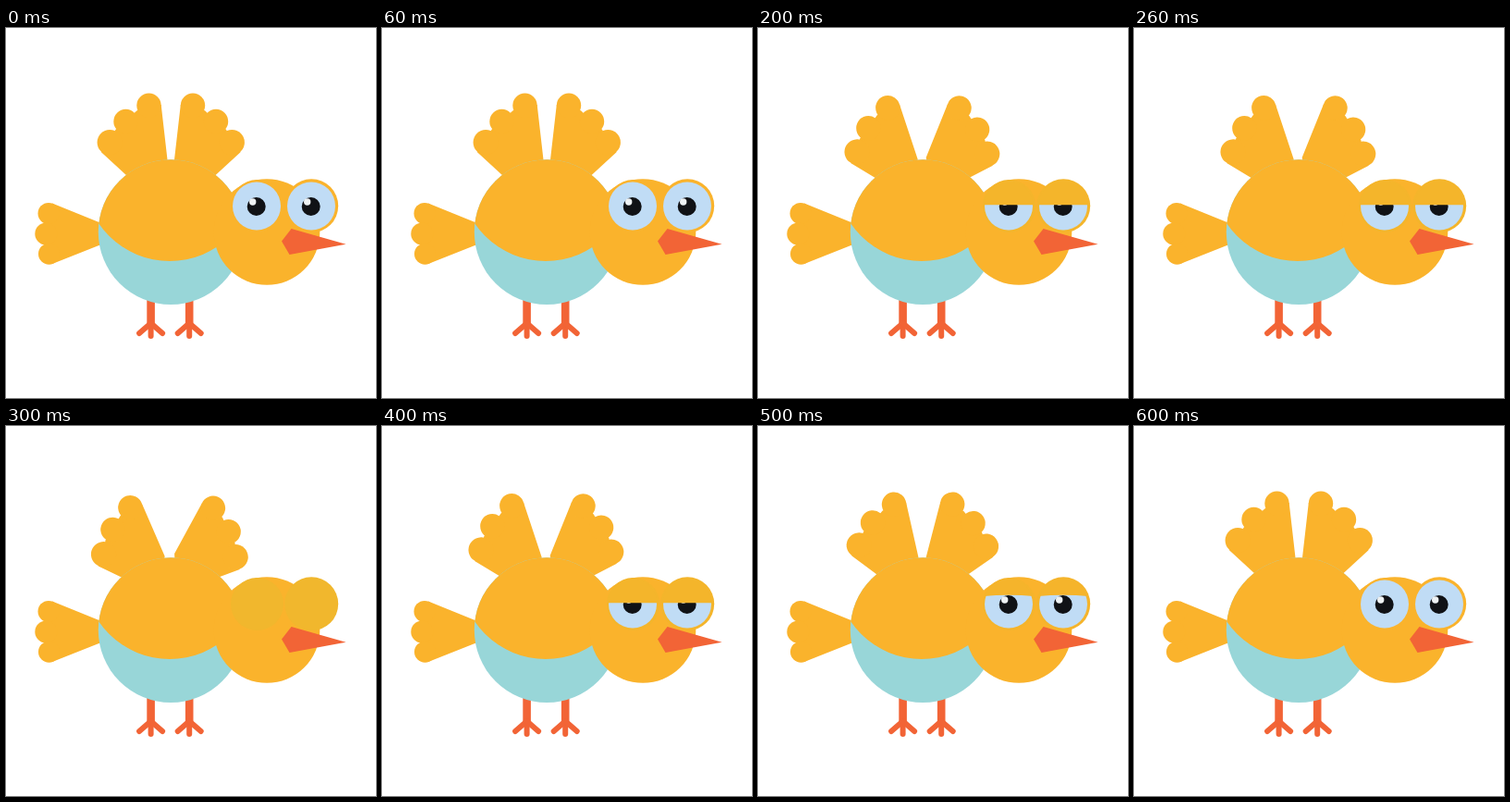
Animation of 400x400 px, one loop 0.7 s. Source, as an HTML page with a canvas:

```html
<!DOCTYPE html>
<html lang="en">
<head>
<meta charset="utf-8">
<title>Blinking bird</title>
<style>
html, body { margin: 0; width: 100%; height: 100%; overflow: hidden; background: #fff; }
canvas { display: block; width: 400px; height: 400px; }
</style>
</head>
<body>
<canvas id="stage" width="400" height="400"></canvas>
<script>
const ctx = document.getElementById('stage').getContext('2d');
const YELLOW = '#fab32c', TEAL = '#98d6d8', ORANGE = '#f26436', EYE = '#c0dcf5';
const STEP = 100, STEPS = 7;
const LIDS = [YELLOW, '#f5b42b', '#f4b52b', '#f1b72d'];
const RAD = Math.PI / 180;

function disc(x, y, r, color) {
  ctx.fillStyle = color;
  ctx.beginPath();
  ctx.arc(x, y, r, 0, Math.PI * 2);
  ctx.fill();
}

function poly(points, color) {
  ctx.fillStyle = color;
  ctx.beginPath();
  for (const [x, y] of points) ctx.lineTo(x, y);
  ctx.closePath();
  ctx.fill();
}

function line(x1, y1, x2, y2, width, cap) {
  ctx.lineWidth = width;
  ctx.lineCap = cap;
  ctx.beginPath();
  ctx.moveTo(x1, y1);
  ctx.lineTo(x2, y2);
  ctx.stroke();
}

// Left-hand wing, turned about the pivot (px, py).
function wing(px, py, angle) {
  ctx.save();
  ctx.translate(px, py);
  ctx.rotate(-angle * RAD);
  ctx.translate(-px, -py);
  poly([[154.5, 84], [167.7, 83], [174.8, 145], [160, 178], [131, 160], [103, 134.2],
        [112.2, 123.7], [118.5, 109.7], [129.5, 101], [141.2, 89.5]], YELLOW);
  disc(154.5, 83.8, 13.2, YELLOW);
  disc(129.5, 101, 13.2, YELLOW);
  disc(112.2, 123.7, 13.6, YELLOW);
  ctx.restore();
}

// The wings spread a little slower towards the end of the swing.
function wings(k) {
  wing(159.3, 153.6, 6.4 * k - 0.25 * k * k);
  ctx.save();
  ctx.translate(356.5, 0);
  ctx.scale(-1, 1);
  wing(156.5, 142.5, 8.4 * k - 0.35 * k * k);
  ctx.restore();
}

function tail() {
  poly([[46, 200], [50, 189.6], [103, 211], [103, 234], [50, 255], [46, 244], [43, 222]], YELLOW);
  disc(46, 200.5, 11.5, YELLOW);
  disc(43.3, 222.5, 12, YELLOW);
  disc(46.5, 244.2, 11.5, YELLOW);
}

function leg(x) {
  ctx.strokeStyle = ORANGE;
  line(x, 290, x, 321, 8.6, 'butt');
  line(x, 319, x, 333, 6, 'round');
  line(x - 1, 320, x - 12.5, 330, 6, 'round');
  line(x + 1, 320, x + 12.5, 330, 6, 'round');
}

function body() {
  ctx.save();
  ctx.beginPath();
  ctx.arc(178.2, 220.6, 78.4, 0, Math.PI * 2);
  ctx.fillStyle = TEAL;
  ctx.fill();
  ctx.clip();
  disc(177, 159.2, 92.8, YELLOW);
  ctx.restore();
}

function eye(x, k) {
  const y = 192.5, r = 26;
  if (k === 3) return;
  disc(x, y, r, EYE);
  disc(x - 0.3, 193, 10, '#101216');
  disc(x - 4.3, 188, 3.7, '#eef2f4');
  if (k === 0) return;
  // The lid covers the eye down to its edge, slightly arched when half raised.
  const edge = k === 1 ? 184 : 191.3, arch = k === 1 ? 181.6 : 191.3;
  ctx.save();
  ctx.beginPath();
  ctx.arc(x, y, r + 1, 0, Math.PI * 2);
  ctx.clip();
  ctx.fillStyle = LIDS[k];
  ctx.beginPath();
  ctx.moveTo(x - 28, 160);
  ctx.lineTo(x - 28, edge);
  ctx.quadraticCurveTo(x, arch, x + 28, edge);
  ctx.lineTo(x + 28, 160);
  ctx.fill();
  ctx.restore();
}

function head(k) {
  disc(282, 220.5, 57.3, YELLOW);
  disc(271.5, 192.5, 28.5, LIDS[k]);
  disc(330.2, 192.3, 29, LIDS[k]);
  eye(271, k);
  eye(330, k);
  poly([[298, 230.5], [308.5, 217], [367.5, 233.8], [306.5, 245]], ORANGE);
}

function draw(ms) {
  const step = Math.floor(ms / STEP) % STEPS;
  const k = 3 - Math.abs(3 - step);
  ctx.fillStyle = '#fff';
  ctx.fillRect(0, 0, 400, 400);
  tail();
  wings(k);
  leg(156.6);
  leg(198.2);
  body();
  head(k);
}

const start = performance.now();
function tick() {
  draw(performance.now() - start);
  requestAnimationFrame(tick);
}
tick();
</script>
</body>
</html>
```
